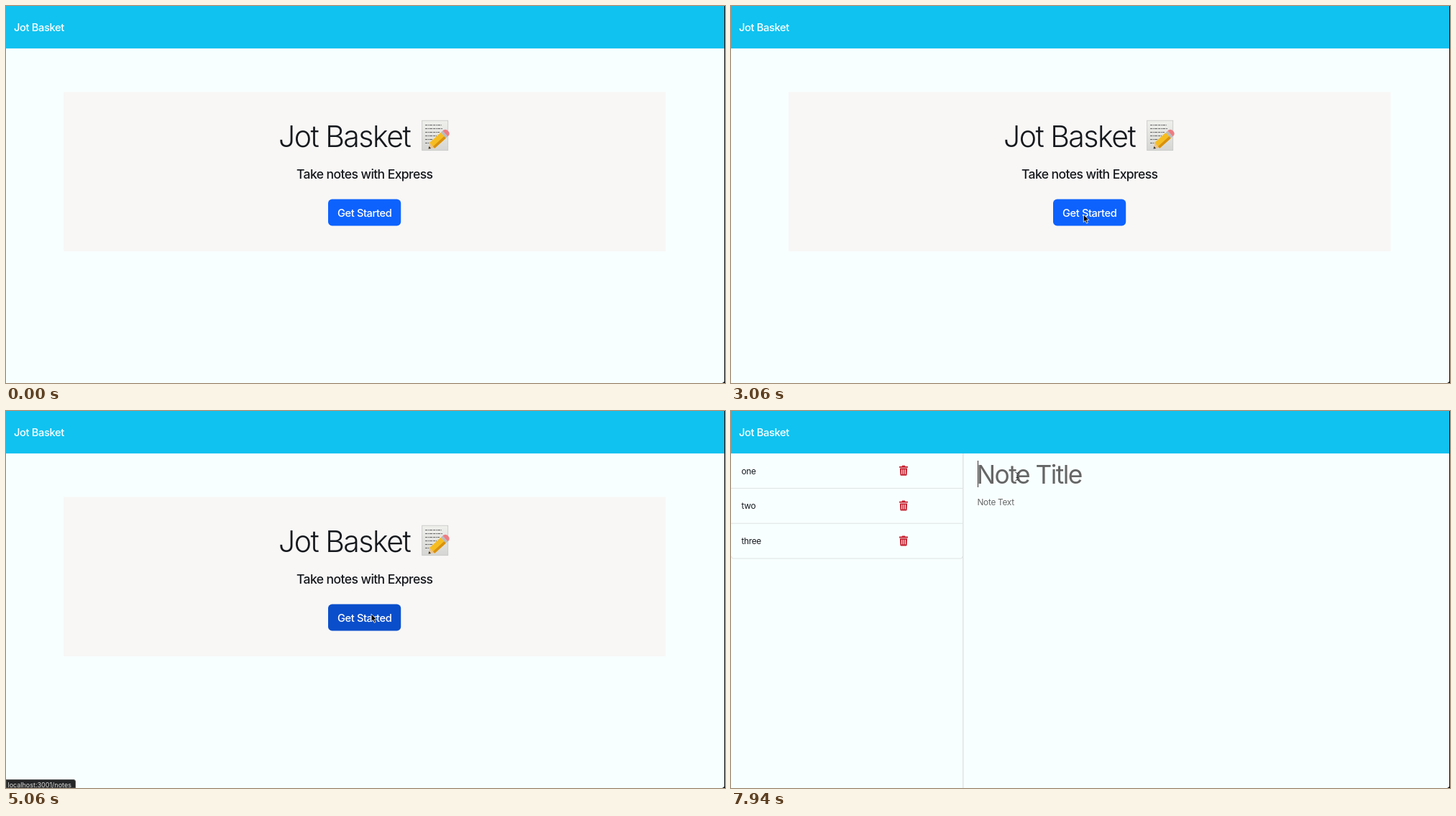
An HTML page that plays this animation: 1000 px wide and 524 px high, repeating every 8 s.

```html
<!DOCTYPE html>
<html lang="en">
<head>
<meta charset="utf-8">
<title>Jot Basket</title>
<style>
html, body { margin: 0; width: 100%; height: 100%; overflow: hidden; background: #f8ffff; }
svg { display: block; width: 100vw; height: 100vh; }
text { font-family: Inter, "Liberation Sans", sans-serif; font-optical-sizing: none; fill: #16191d; }
.brand { font-size: 14.7px; font-weight: 450; letter-spacing: -.025em; fill: #fff; }
.title { font-size: 41px; font-weight: 340; letter-spacing: -.037em; }
.sub { font-size: 17.6px; font-weight: 530; letter-spacing: -.035em; }
.button { font-size: 14.7px; font-weight: 450; letter-spacing: -.028em; fill: #fff; }
.small { font-size: 11.8px; letter-spacing: -.023em; }
.heading { font-size: 35.3px; font-weight: 420; letter-spacing: -.043em; }
.hint { fill: #666; }
.status { font-size: 9px; fill: #ddd; }
.mid { text-anchor: middle; }
</style>
</head>
<body>
<svg viewBox="0 0 1000 524">
  <defs>
    <linearGradient id="paper" x2="0" y2="1">
      <stop stop-color="#efefec"/><stop offset="1" stop-color="#d5d6d3"/>
    </linearGradient>
    <g id="trash" fill="#c5202f">
      <path d="M0 1.2H3.4L4.2 0H7.8L8.6 1.2H12V3H0Z"/>
      <path d="M.9 3.8H11.1L10.6 13Q10.5 14 9.5 14H2.5Q1.5 14 1.4 13Z"/>
      <path d="M3.6 5.5V12M6 5.5V12M8.4 5.5V12" stroke="#f8ffff"/>
    </g>
  </defs>
  <rect width="1000" height="524" fill="#f8ffff"/>
  <rect width="1000" height="59" fill="#0fc2f0"/>
  <text class="brand" x="11" y="35">Jot Basket</text>

  <g id="home">
    <rect x="80" y="119.5" width="837.5" height="221.5" fill="#f8f7f6"/>
    <text class="title" x="379" y="196">Jot Basket</text>
    <g>
      <rect x="578.7" y="159.2" width="36" height="41.5" fill="url(#paper)" stroke="#c4c5c2" stroke-width=".8"/>
      <path d="M583 165.5H606M583 170.5H607M583 175.5H603M583 180.5H599M583 185.5H594M583 190.5H589"
        fill="none" stroke="#666" stroke-dasharray="3 .8 1.6 .7 4 1"/>
      <g transform="translate(587.5 198.5) rotate(-42)">
        <path d="M0 0L8-5.3V5.3Z" fill="#e9c490"/>
        <path d="M0 0L3-2V2Z" fill="#333"/>
        <path d="M7-5.3H28V5.3H7Z" fill="#f6bd22"/>
        <path d="M7 1.8H28V5.3H7Z" fill="#d9910e"/>
        <path d="M28-5.3H31.5V5.3H28Z" fill="#b9bcbd"/>
        <path d="M31.5-5.3H33Q37-4.5 37 0T33 5.3H31.5Z" fill="#ed7d83"/>
      </g>
    </g>
    <text class="sub mid" x="498.7" y="240">Take notes with Express</text>
    <rect id="button" x="448" y="268.6" width="101.2" height="36.8" rx="5.5"/>
    <text class="button mid" x="498.7" y="292.5">Get Started</text>
    <g id="status">
      <path d="M0 512.5H94Q96.5 512.5 96.5 515V524H0Z" fill="#252627" stroke="#555"/>
      <text class="status" x="2.5" y="523">localhost:3001/notes</text>
    </g>
  </g>

  <g id="notes">
    <path d="M322.8 59V524" stroke="#d9dddd" stroke-width="1.2"/>
    <path d="M0 107.4H322M0 156.2H322M.5 202Q.5 205 3 205H319.5Q322 205 322 202"
      fill="none" stroke="#dde1e1"/>
    <text class="small" x="14.5" y="87.5">one</text>
    <text class="small" x="14.5" y="136.3">two</text>
    <text class="small" x="14.5" y="185">three</text>
    <use href="#trash" x="234" y="75.8"/>
    <use href="#trash" x="234" y="124.6"/>
    <use href="#trash" x="234" y="173.4"/>
    <text class="heading hint" x="341.5" y="101.3">Note Title</text>
    <text class="small hint" x="342.5" y="131">Note Text</text>
    <path id="caret" d="M343.5 69V106" stroke="#333"/>
  </g>

  <path d="M999.5 0V524" stroke="#0b0d0e"/>
  <path d="M1000 519Q999.5 523 996 524H1000Z" fill="#0b0d0e"/>

  <g id="pointer">
    <path id="arrow" d="M0 0V10.6L2.4 8.4L4.2 12.3L6 11.5L4.3 7.7H7.6Z" fill="#000" stroke="#fff" stroke-width=".8"/>
    <path id="hand" d="M2.6 7.5V1.6Q2.7.5 3.6.5T4.6 1.6V5Q6.2 4.3 6.6 5.4Q8.2 4.9 8.6 6.1Q10.4 5.8 10.4 7.4V10Q10.2 11.3 9.4 12.3V13.5H4.2V12.3L.8 8.6Q.1 7.3 1.2 7Z M4.6 5V7.3M6.6 5.4V7.3M8.6 6.1V7.5"
      fill="#fff" stroke="#111" stroke-width=".9" stroke-linejoin="round"/>
    <path id="beam" d="M-2.5-5.5Q0-5.5 0-4Q0-5.5 2.5-5.5M0-4V4M-2.5 5.5Q0 5.5 0 4Q0 5.5 2.5 5.5M-1.5 1.5H1.5"
      fill="none" stroke="#222" stroke-width=".9"/>
  </g>
</svg>
<script>
const LOOP = 8000, APPEAR = 1300, HOVER = 4500, OPEN = 5500, CLICK = 7760;
// time, x, y of the pointer
const path = [
  [APPEAR, 444, 470], [1900, 448, 329], [2300, 448, 329], [2950, 490, 290], [3500, 493, 288],
  [4250, 493, 288], [4600, 508, 282], [OPEN, 508, 282], [6050, 240, 160], [6550, 36, 101],
  [6900, 36, 101], [7230, 170, 230], [7620, 398, 91], [LOOP, 398, 91]
];
const el = id => document.getElementById(id);
const show = (id, on) => el(id).style.display = on ? '' : 'none';
const mix = (a, b, k) => a + (b - a) * k;
const clamp = k => Math.max(0, Math.min(1, k));

function pointerAt(t) {
  const i = Math.max(1, path.findIndex(p => p[0] > t));
  const [t0, x0, y0] = path[i - 1], [t1, x1, y1] = path[i];
  const k = clamp((t - t0) / (t1 - t0)), ease = k * k * (3 - 2 * k);
  return [mix(x0, x1, ease), mix(y0, y1, ease)];
}

function draw(t) {
  const opened = t >= OPEN, [x, y] = pointerAt(t);
  show('home', !opened);
  show('notes', opened);
  show('status', t >= HOVER);
  show('caret', t >= CLICK);
  const k = clamp((t - HOVER) / 150);
  el('button').setAttribute('fill', `rgb(${mix(13, 10, k)},${mix(98, 78, k)},${mix(254, 203, k)})`);

  const kind = !opened ? 'arrow' : x > 330 ? 'beam' : y < 205 ? 'hand' : 'arrow';
  for (const id of ['arrow', 'hand', 'beam']) show(id, id === kind);
  show('pointer', t >= APPEAR);
  el('pointer').setAttribute('transform', `translate(${x} ${y})`);
}

const start = performance.now();
function tick() {
  draw((performance.now() - start) % LOOP);
  requestAnimationFrame(tick);
}
tick();
</script>
</body>
</html>
```
